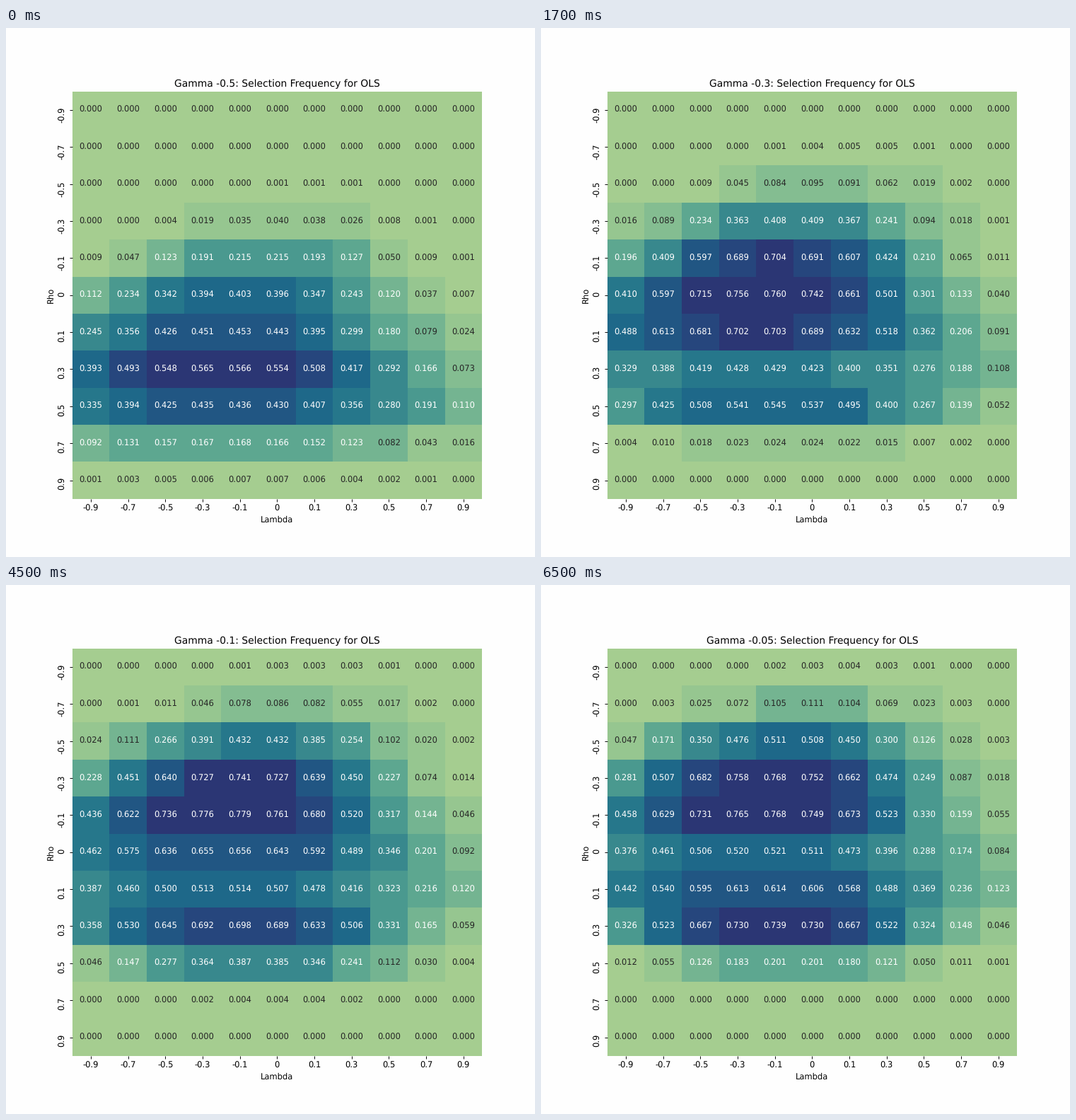
These frames come from a looping animation (748x748 px, 8000 ms). A matplotlib script:

```python
import numpy as np
import matplotlib.pyplot as plt
from matplotlib.animation import FuncAnimation
from matplotlib.colors import BoundaryNorm, LinearSegmentedColormap, ListedColormap

plt.rcParams.update({"font.family": "DejaVu Sans", "text.hinting": "none"})

SIZE, INCHES = 748, 9
LEVELS = ["-0.9", "-0.7", "-0.5", "-0.3", "-0.1", "0",
          "0.1", "0.3", "0.5", "0.7", "0.9"]
N = len(LEVELS)
WHITE_TEXT_FROM = 39 / 256

# Gamma, row of the widest spread, then two bumps over the rows,
# each given by height, center and reach.
SCENES = [
    ("-0.5", 8.0, (.44, 6.0, 2.24), (.22, 7.9, 1.35)),
    ("-0.3", 7.0, (.76, 5.0, 2.35), (.45, 8.0, .68)),
    ("-0.2", 6.4, (.79, 4.4, 2.10), (.50, 7.35, 1.10)),
    ("-0.1", 5.9, (.78, 3.8, 2.15), (.67, 7.1, 1.10)),
    ("-0.05", 5.7, (.78, 3.5, 2.00), (.74, 6.8, 1.10)),
]


def bump(x, height, center, reach):
    """Flat-topped bell curve."""
    return height * np.exp(-np.abs((x - center) / reach) ** 3)


def frequencies(widest, upper, lower):
    """Rows swell and fade by two bumps; each row is a bell over the columns."""
    row, col = np.mgrid[:N, :N]
    height = bump(row, *upper) + bump(row, *lower)
    offset = row - widest
    center = 3.6 + .09 * (offset + .8) ** 2
    reach = 5.7 - np.where(offset < 0, -.66, 1.1) * offset
    return bump(col, height, center, np.maximum(reach, 1))


# Green to navy ramp, shown in twelve flat bands.
ramp = LinearSegmentedColormap.from_list("ramp", [
    "#a5cd90", "#7dba91", "#59a590", "#40908e",
    "#287a8c", "#1c6488", "#254b7f", "#2c3172"])
edges = [0, .019, .097, .133, .22, .32, .43, .539, .638, .74, .85, .922, 1.01]
shades = [0, .055, .12, .18, .27, .37, .48, .59, .69, .79, .88, .97]
bands = ListedColormap(ramp(shades))

fig, ax = plt.subplots(figsize=(INCHES, INCHES), dpi=SIZE / INCHES,
                       facecolor="#fefefe")
fig.subplots_adjust(left=.125, right=.9, bottom=.11, top=.88)
mesh = ax.pcolormesh(np.zeros((N, N)), cmap=bands,
                     norm=BoundaryNorm(edges, bands.N))
ax.set(xlim=(0, N), ylim=(N, 0), xlabel="Lambda", ylabel="Rho")
centers = np.arange(N) + .5
ax.set_xticks(centers, LEVELS)
ax.set_yticks(centers, LEVELS, rotation=90)
ax.spines[:].set_visible(False)
title = ax.set_title("")
labels = [ax.text(x, y, "", ha="center", va="center")
          for y in centers for x in centers]


def update(frame):
    # The first scene holds one tick, later ones four.
    gamma, *shape = SCENES[(frame + 3) // 4]
    values = frequencies(*shape)
    share = values / values.max()
    mesh.set_array(share)
    title.set_text(f"Gamma {gamma}: Selection Frequency for OLS")
    for label, value, s in zip(labels, values.flat, share.flat):
        label.set_text(f"{value:.3f}")
        label.set_color("white" if s >= WHITE_TEXT_FROM else ".15")
    return [mesh, title, *labels]


anim = FuncAnimation(fig, update, frames=16, interval=500, repeat=True)
plt.show()
```
